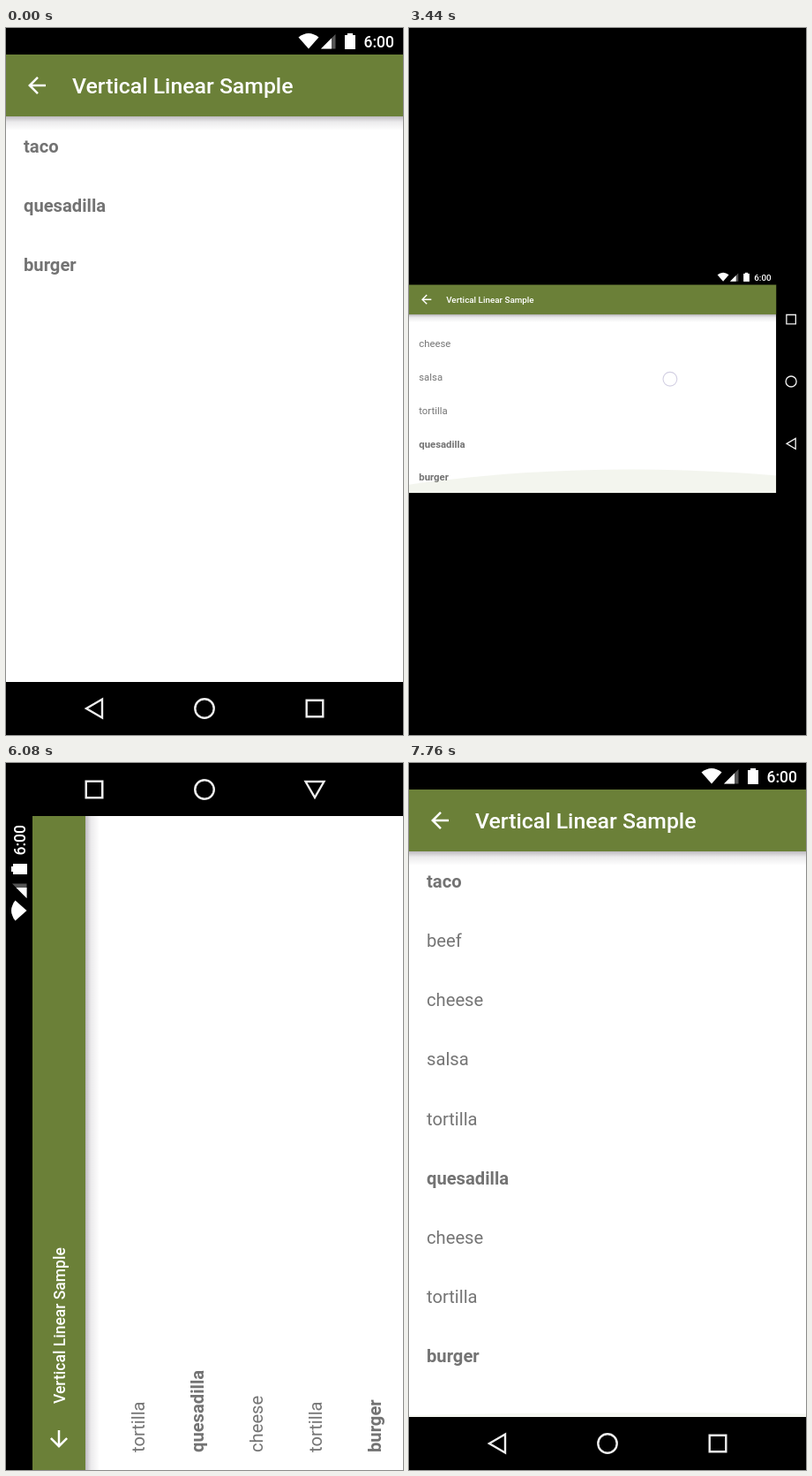
An HTML page with a canvas that plays this animation: 450x800 px, repeating every 8000 ms.

```html
<!DOCTYPE html>
<html lang="en">
<head>
<meta charset="utf-8">
<title>Expandable list</title>
<style>
  html, body { margin: 0; height: 100%; overflow: hidden; background: #000; }
  canvas { display: block; }
</style>
</head>
<body>
<canvas id="stage" width="450" height="800"></canvas>
<script>
const LOOP = 8000, ROW = 67.1, OLIVE = '#6b8038', FIT = 450 / 800;
const stage = document.getElementById('stage').getContext('2d');
const layer = document.createElement('canvas').getContext('2d');

const sections = [
  { name: 'taco', kids: ['beef', 'cheese', 'salsa', 'tortilla'], opens: 865 },
  { name: 'quesadilla', kids: ['cheese', 'tortilla'], opens: 4250 },
  { name: 'burger', kids: [], opens: 0 }
];

// Drags in screen pixels: finger y, glow stretch and glow alpha as time/value pairs.
const drags = [
  { start: 3270, up: 3640, end: 4110, x: 526, y: [3270, 360, 3440, 221, 3620, 72],
    stretch: [3380, 0, 3440, .324, 3620, .45, 3850, .22, 4100, 0],
    alpha: [3380, 0, 3440, .08, 3620, .33, 3850, .18, 4100, 0] },
  { start: 4790, up: 5400, end: 5770, x: 576, y: [4790, 380, 5100, 250, 5360, 79],
    stretch: [5120, 0, 5360, .424, 5400, .43, 5580, .19, 5760, 0],
    alpha: [5120, 0, 5360, .34, 5400, .34, 5580, .18, 5760, 0] },
  { start: 7030, up: 7410, end: 7820, x: 303, y: [7030, 565, 7120, 462, 7400, 73],
    stretch: [7030, .3, 7120, .805, 7240, 1, 7400, 1, 7580, .45, 7760, .055, 7810, 0],
    alpha: [7030, .06, 7120, .2, 7300, .36, 7400, .36, 7580, .2, 7760, .07, 7810, 0] }
];

const clamp = (v, lo = 0, hi = 1) => Math.min(hi, Math.max(lo, v));
const smooth = x => (1 - Math.cos(Math.PI * clamp(x))) / 2;

function track(t, keys) {
  if (t <= keys[0]) return keys[1];
  for (let i = 2; i < keys.length; i += 2) {
    if (t < keys[i]) {
      const k = (t - keys[i - 2]) / (keys[i] - keys[i - 2]);
      return keys[i - 1] + (keys[i + 1] - keys[i - 1]) * k;
    }
  }
  return keys[keys.length - 1];
}

function scrollAt(t) {
  const pull = d => d.y[1] - 10 - track(t, d.y);
  const first = clamp(pull(drags[0]), 0, 109);
  return first + clamp(pull(drags[1]), 0, 134);
}

function polygon(c, color, ...p) {
  c.fillStyle = color;
  c.beginPath();
  for (let i = 0; i < p.length; i += 2) c.lineTo(p[i], p[i + 1]);
  c.fill();
}

function clipRect(c, x, y, w, h) {
  c.beginPath();
  c.rect(x, y, w, h);
  c.clip();
}

function label(c, text, x, y, size, weight, color) {
  c.font = `${weight} ${size}px Roboto, sans-serif`;
  c.fillStyle = color;
  c.fillText(text, x, y);
}

function drawList(c, top, scroll, t) {
  let y = top + ROW / 2 - scroll + 7.6;
  for (const { name, kids, opens } of sections) {
    label(c, name, 20, y, 20.2, 700, '#737373');
    c.globalAlpha = clamp((t - opens - 250) / 120);
    kids.forEach((kid, i) => label(c, kid, 20, y + ROW * (i + 1), 20.2, 400, '#757575'));
    c.globalAlpha = 1;
    y += ROW * (1 + kids.length * smooth((t - opens) / 250));
  }
}

function drawGlow(c, w, h, drag, t) {
  const r = w * 1.5, s = track(t, drag.stretch);
  const depth = r * (1 - Math.cos(Math.PI / 6));
  c.globalAlpha = track(t, drag.alpha);
  c.fillStyle = OLIVE;
  c.beginPath();
  c.ellipse(w / 2 + (drag.x - w / 2) / 2, h + s * (r - depth), r, s * r, 0, 0, 7);
  c.fill();
  c.globalAlpha = 1;
}

function drawTouch(c, x, y) {
  const fill = c.createRadialGradient(x, y, 2, x, y, 8);
  fill.addColorStop(0, 'rgba(255,255,255,.42)');
  fill.addColorStop(1, 'rgba(255,255,255,.62)');
  c.beginPath();
  c.arc(x, y, 14, 0, 7);
  c.fillStyle = fill;
  c.fill();
  c.strokeStyle = 'rgba(175,170,205,.55)';
  c.lineWidth = 2;
  c.stroke();
}

function drawStatus(c, w) {
  c.fillStyle = '#000';
  c.fillRect(0, 0, w, 30);
  c.fillStyle = '#fff';
  c.beginPath();
  c.moveTo(w - 107, 23.5);
  c.lineTo(w - 118.5, 10.5);
  c.quadraticCurveTo(w - 107, 1.5, w - 95.5, 10.5);
  c.fill();
  polygon(c, '#555', w - 93, 23.5, w - 76.5, 7, w - 76.5, 23.5);
  polygon(c, '#fff', w - 93, 23.5, w - 81, 11.5, w - 81, 23.5);
  c.fillRect(w - 66, 8, 12, 16);
  c.fillRect(w - 63, 6, 6, 2);
  c.textAlign = 'right';
  label(c, '6:00', w - 10, 22, 17.5, 500, '#fff');
  c.textAlign = 'left';
}

function drawHeader(c, w, top, upright) {
  const shadow = c.createLinearGradient(0, top, 0, top + 16);
  shadow.addColorStop(0, 'rgba(40,30,45,.3)');
  shadow.addColorStop(.4, 'rgba(40,30,45,.09)');
  shadow.addColorStop(1, 'rgba(40,30,45,0)');
  c.fillStyle = shadow;
  c.fillRect(0, top, w, 16);
  c.fillStyle = OLIVE;
  c.fillRect(0, 30, w, top - 30);

  const mid = (30 + top) / 2;
  c.strokeStyle = '#fff';
  c.lineWidth = 2.5;
  c.beginPath();
  c.moveTo(45, mid);
  c.lineTo(27, mid);
  c.moveTo(36, mid - 9.2);
  c.lineTo(26.8, mid);
  c.lineTo(36, mid + 9.2);
  c.stroke();
  const size = upright ? 24.8 : 17.5;
  label(c, 'Vertical Linear Sample', 75, mid + size * .38, size, 500, '#fff');
}

function drawNav(c, upright) {
  const at = (x, draw) => {
    c.save();
    if (upright) c.translate(x, 770); else c.translate(770, 450 - x);
    c.beginPath();
    draw();
    c.closePath();
    c.stroke();
    c.restore();
  };
  c.strokeStyle = '#eee';
  c.lineWidth = 2.4;
  at(100, () => { c.moveTo(-9, 0); c.lineTo(9, -10.5); c.lineTo(9, 10.5); });
  at(225, () => c.arc(0, 0, 10.7, 0, 7));
  at(350, () => c.rect(-9.3, -9.3, 18.6, 18.6));
}

function drawScreen(c, upright, t) {
  const [w, h, top] = upright ? [450, 740, 100] : [740, 450, 90];
  const drag = drags.find(d => t >= d.start && t < d.end);
  c.fillStyle = '#000';
  c.fillRect(0, 0, upright ? 450 : 800, upright ? 800 : 450);
  c.save();
  clipRect(c, 0, top, w, h - top);
  c.fillStyle = '#fff';
  c.fillRect(0, top, w, h - top);
  drawList(c, top, upright ? 0 : scrollAt(t), t);
  if (drag) drawGlow(c, w, h, drag, t);
  c.restore();
  drawHeader(c, w, top, upright);
  drawStatus(c, w);
  drawNav(c, upright);
  if (drag && t < drag.up) drawTouch(c, drag.x, track(t, drag.y));
  if (t >= 4235 && t < 4320) drawTouch(c, 209, 345);
}

// The previous orientation turns, stretches and fades above the new one, which shows only inside it.
function drawTurn(c, upright, t, start, before, direction) {
  const [w, h] = upright ? [450, 800] : [800, 450];
  const left = (1 - clamp((t - start) / 500)) ** 5;
  const oldW = w + (h - w) * left, oldH = h + (w - h) * left;
  c.save();
  clipRect(c, 0, 0, w, h);
  c.translate(w / 2, h / 2);
  c.rotate(direction * left * Math.PI / 2);
  clipRect(c, -oldW / 2, -oldH / 2, oldW, oldH);
  c.save();
  c.translate(-w / 2, -h / 2);
  drawScreen(c, upright, t);
  c.restore();
  if (left > 0) {
    layer.canvas.width = h;
    layer.canvas.height = w;
    drawScreen(layer, !upright, before);
    c.globalAlpha = left;
    c.imageSmoothingQuality = 'high';
    c.drawImage(layer.canvas, -oldW / 2, -oldH / 2, oldW, oldH);
  }
  c.restore();
}

function frame() {
  const t = performance.now() % LOOP;
  stage.fillStyle = '#000';
  stage.fillRect(0, 0, 450, 800);
  stage.save();
  if (t < 2240) {
    drawScreen(stage, true, t);
  } else if (t < 6000) {
    stage.translate(0, (800 - 450 * FIT) / 2);
    stage.scale(FIT, FIT);
    drawTurn(stage, false, t, 2533, 2200, 1);
  } else {
    drawTurn(stage, true, t, 6295, 5990, -1);
  }
  stage.restore();
  requestAnimationFrame(frame);
}
frame();
</script>
</body>
</html>
```
